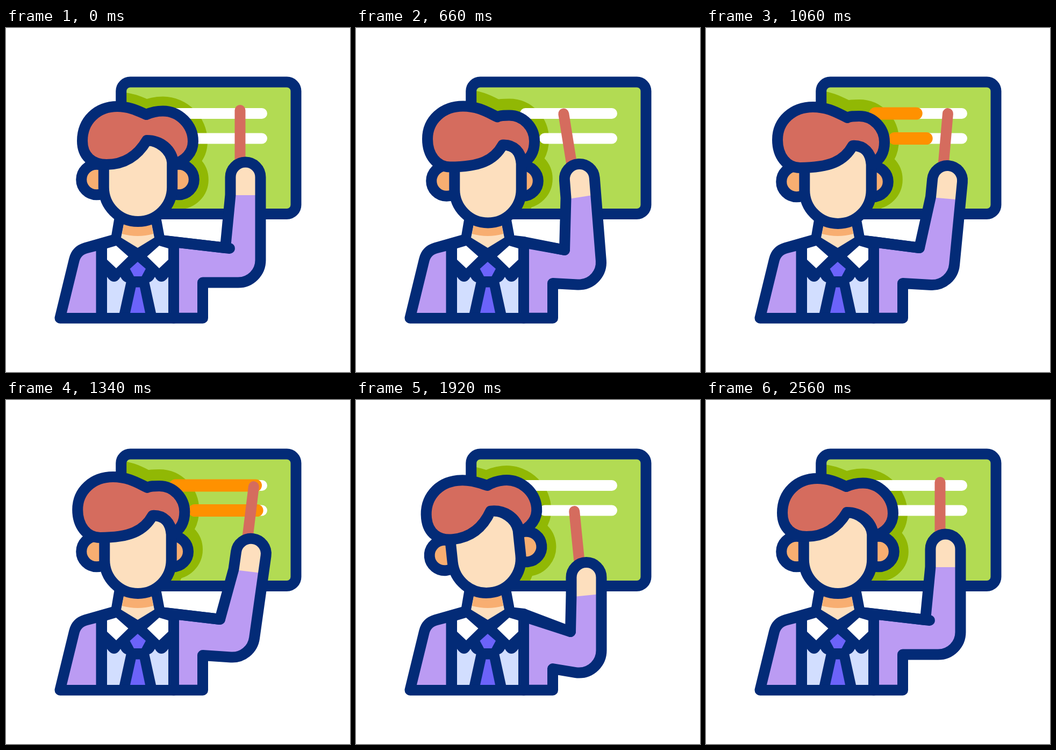
An HTML page with a canvas that plays this animation: 640 px wide and 640 px high, repeating every 2.8 s.

```html
<!DOCTYPE html>
<html lang="en">
<head>
<meta charset="utf-8">
<title>Teacher at the board</title>
<style>
  html, body { margin: 0; width: 100%; height: 100%; overflow: hidden; background: #fff; }
  canvas { display: block; width: 640px; height: 640px; }
</style>
</head>
<body>
<canvas width="640" height="640"></canvas>
<script>
const ctx = document.querySelector('canvas').getContext('2d');
const LOOP = 2800, RAD = Math.PI / 180;
const NAVY = '#032b77', PURPLE = '#bb9bf3', SKIN = '#fddfbe', PEACH = '#f8ae71',
  HAIR = '#d56c5e', GREEN = '#b2db53', SHADE = '#91b804', ORANGE = '#ff9100';

// Pose values at the key times, joined by monotone curves
const TIMES = [200, 660, 1060, 1340, 1920, 2260, 2560];
const POSE = {
  turn:       [0, 1, 1, 0.98, 0, 0],
  tilt:       [0, 0, 0, 0, -6, 0.3],
  bob:        [0, 2.5, 3.9, 0, -1, 4.5],
  elbowX:     [432, 414.5, 420.8, 421, 415, 429],
  elbowY:     [432, 436, 436.5, 437, 466, 436],
  forearm:    [154.5, 154.5, 154.5, 154.5, 136, 150.5],
  armAngle:   [0, -4.5, 5.5, 8, 0, 0],
  stickAngle: [0, -9.1, 5, 6.9, -5.7, -0.7],
  innerX:     [408, 388, 397, 398, 399, 405],
  innerY:     [409, 413, 409, 408, 431, 413],
  overlap:    [8, 0, 0, 0, 0, 8],
  armpitY:    [473.5, 475, 475, 475, 500, 478]
};

const HAIR_FRONT = [187,254, 160,254,142,238,142,210, 142,172,170,146,207,146,
  230,146,247,155,261,161, 270,157,280,154.5,292,154.5, 322,154.5,348,180,348,211,
  348,232,334,246,312,254, 309,224,286,209,262,209, 246,236,222,254,187,254];
const HAIR_TURNED = [175,256, 150,256,133,234,133,204, 133,168,162,143,199,143,
  228,143,246,155,263,163, 268,160,276,160,285,160, 312,160,332,183,332,208,
  332,228,325,240,309,250, 307,228,294,214,273,215, 257,244,230,256,175,256];

const lerp = (a, b, u) => a + (b - a) * u;
const clamp = u => Math.max(0, Math.min(1, u));
const smooth = u => (u = clamp(u), u * u * (3 - 2 * u));

function valueAt(keys, t) {
  const v = [...keys, keys[0]], last = TIMES.length - 1;
  if (t <= TIMES[0] || t >= TIMES[last]) return v[0];
  const i = TIMES.findIndex(k => k > t) - 1;
  const slope = j => (v[j + 1] - v[j]) / (TIMES[j + 1] - TIMES[j]);
  const tangent = j => {
    if (j === 0 || j === last) return 0;
    const a = slope(j - 1), b = slope(j);
    return a * b > 0 ? 2 * a * b / (a + b) : 0;
  };
  const h = TIMES[i + 1] - TIMES[i], u = (t - TIMES[i]) / h;
  return lerp(v[i], v[i + 1], smooth(u)) +
    h * u * (1 - u) * (tangent(i) * (1 - u) - tangent(i + 1) * u);
}

function fill(shape, color) {
  ctx.fillStyle = color;
  ctx.fill(typeof shape === 'string' ? new Path2D(shape) : shape);
}

function stroke(path, color = NAVY, width = 20) {
  ctx.strokeStyle = color;
  ctx.lineWidth = width;
  ctx.stroke(path);
}

function line(x1, y1, x2, y2, color, width) {
  stroke(new Path2D(`M${x1} ${y1}L${x2} ${y2}`), color, width);
}

function headPaths(turn) {
  const ears = new Path2D();
  for (const x of [168.5, lerp(321.5, 310.5, turn)]) {
    ears.moveTo(x + 28.3, 282);
    ears.arc(x, 282, 28.3, 0, 7);
  }
  const r = lerp(63.7, 62.2, turn), face = new Path2D();
  const tipX = lerp(262, 273, turn), tipY = lerp(209, 215, turn);
  face.moveTo(tipX, tipY);
  face.lineTo(245.5 - r, 242);
  face.arc(245.5, 360 - r, r, Math.PI, 0, true);
  face.lineTo(245.5 + r, 250);
  face.bezierCurveTo(243.5 + r, 227, tipX + 22, tipY, tipX, tipY);
  const p = HAIR_FRONT.map((n, i) => lerp(n, HAIR_TURNED[i], turn));
  const hair = new Path2D();
  hair.moveTo(p[0], p[1]);
  for (let i = 2; i < p.length; i += 6) hair.bezierCurveTo(...p.slice(i, i + 6));
  hair.closePath();
  return { ears, face, hair };
}

function placeHead(pose) {
  ctx.translate(243, 320 + pose.bob);
  ctx.rotate(pose.tilt * RAD);
  ctx.translate(-243, -320);
}

function drawBoard(pose, head, t) {
  const board = new Path2D();
  board.roundRect(214.2, 100.5, 325.3, 245.5, 17);
  fill(board, GREEN);
  ctx.save();
  ctx.clip(board);
  placeHead(pose);
  ctx.translate(0, -4 * pose.turn);
  for (const part of [head.ears, head.face, head.hair]) {
    fill(part, SHADE);
    stroke(part, SHADE, 54);
  }
  ctx.restore();
  stroke(board);

  const grown = smooth((t - 680) / 790);
  for (const [x, y] of [[315, 159], [351, 205.5]]) {
    line(x, y, 476, y, '#fff', 20);
    if (grown > 0) {
      ctx.globalAlpha = 1 - smooth((t - 1480) / 280);
      line(x, y, lerp(x, 476, grown), y, ORANGE, 23);
      ctx.globalAlpha = 1;
    }
  }
}

function drawTorso() {
  const torso = new Path2D('M100.5 539.7L127 431Q131 414 148 409L205 393L212 352H278L286 395L312 398V539.7Z');
  fill(torso, NAVY);
  stroke(torso);
  fill('M113 530L136 436Q139 422 152 419L167.5 415V530Z', PURPLE);
  fill('M222 350H268L276 390L245 409L214 390Z', SKIN);
  fill('M222 350H268L274 383Q245 391 216 383Z', PEACH);
}

function drawShirt() {
  for (const side of [1, -1]) {
    ctx.save();
    if (side < 0) {
      ctx.translate(490, 0);
      ctx.scale(-1, 1);
    }
    fill('M188 410L205 405L227.500 425L205 447L188 431Z', '#fff');
    fill('M188 463Q194 472 201 472Q208 472 213 463Q217 471 223.500 473L211 530H188Z', '#d2deff');
    ctx.restore();
  }
  fill('M245 435L260 448L252.500 462H238L230.500 448Z', '#6c63fa');
  fill('M241.500 482.500H249L259 530H231Z', '#6c63fa');
}

function drawArm(pose) {
  const a = pose.armAngle * RAD, b = pose.stickAngle * RAD;
  const { elbowX: ex, elbowY: ey, forearm, innerX, innerY, armpitY } = pose;
  const hx = ex + 13.5 * Math.cos(a) + forearm * Math.sin(a);
  const hy = ey + 13.5 * Math.sin(a) - forearm * Math.cos(a);
  const under = Math.atan2(ey + 41.5 - armpitY, ex - 366);

  ctx.save();
  ctx.translate(hx, hy);
  ctx.rotate(b);
  line(-10, -124.5, -10, 0, HAIR, 20);
  ctx.restore();

  const arm = new Path2D();
  arm.moveTo(312, 539.7);
  arm.lineTo(312, 398);
  arm.lineTo(innerX, innerY);
  arm.lineTo(hx - 28 * Math.cos(a) - 33 * Math.sin(a), hy - 28 * Math.sin(a) + 33 * Math.cos(a));
  arm.arc(hx, hy, 28, Math.PI + a, 2 * Math.PI + a);
  arm.arc(ex, ey, 41.5, a, Math.PI / 2 + under);
  arm.lineTo(366, armpitY);
  arm.lineTo(366, 539.7);
  arm.closePath();
  fill(arm, PURPLE);
  ctx.save();
  ctx.clip(arm);
  ctx.translate(hx, hy);
  ctx.rotate(b);
  ctx.fillStyle = SKIN;
  ctx.fillRect(-45, -45, 90, 78.5);
  ctx.restore();
  stroke(arm);
  line(288, 395, innerX + pose.overlap, innerY + pose.overlap / 8, NAVY, 20);
}

function drawHead(pose, head) {
  ctx.save();
  placeHead(pose);
  for (const [part, color] of [[head.ears, PEACH], [head.face, SKIN], [head.hair, HAIR]]) {
    fill(part, color);
    stroke(part);
  }
  ctx.restore();
}

function draw(now) {
  const t = now % LOOP, pose = {};
  for (const name in POSE) pose[name] = valueAt(POSE[name], t);
  const head = headPaths(pose.turn);
  ctx.fillStyle = '#fff';
  ctx.fillRect(0, 0, 640, 640);
  ctx.lineCap = ctx.lineJoin = 'round';
  drawBoard(pose, head, t);
  drawTorso();
  drawArm(pose);
  drawShirt();
  drawHead(pose, head);
}

const start = performance.now();
function tick() {
  draw(performance.now() - start);
  requestAnimationFrame(tick);
}
tick();
</script>
</body>
</html>
```
